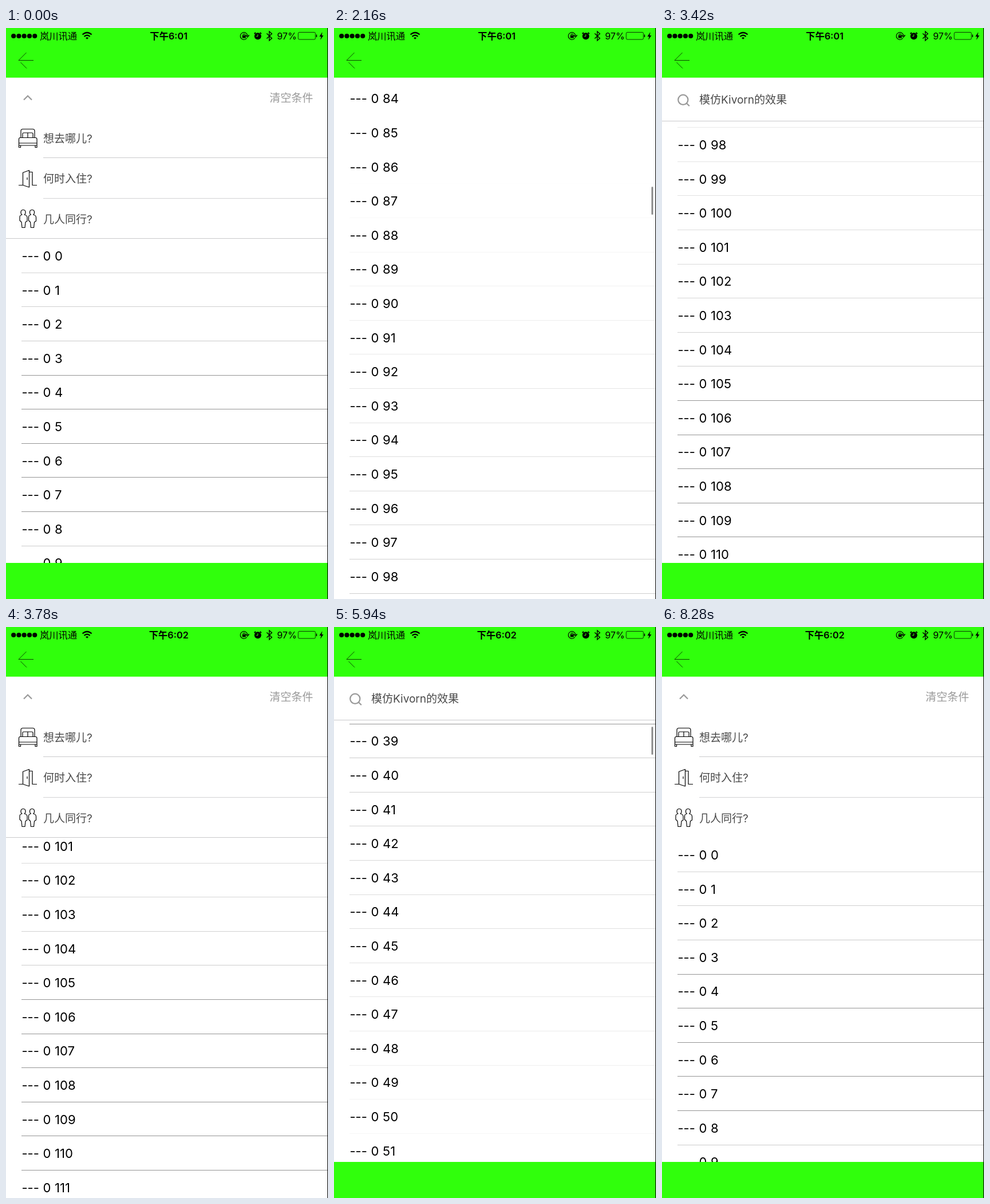
An HTML page for the animation above (8640 ms loop, 562x997 px).

```html
<!DOCTYPE html>
<html lang="zh-CN">
<head>
<meta charset="utf-8">
<title>List with a collapsing search header</title>
<style>
html, body { margin: 0; width: 100%; height: 100%; overflow: hidden; background: #fff; }
svg { display: block; width: 100vw; height: 100vh; }
text { font-family: Inter, "Noto Sans CJK SC", "Noto Sans CJK", sans-serif; }
#list text { font-size: 22px; word-spacing: .5px; }
.label { font-size: 19px; fill: #484848; }
.status { font-size: 16.3px; }
.line { fill: none; stroke: #000; stroke-width: 1.2; stroke-linejoin: round; }
.gray { fill: none; stroke: #999; stroke-width: 2.2; }
.rule { fill: #c9c9cb; }
.bar { fill: #30ff0c; }
</style>
</head>
<body>
<svg viewBox="0 0 562 997" preserveAspectRatio="none">
  <rect width="562" height="997" fill="#fff"/>
  <g id="list"></g>

  <g id="search">
    <rect id="sheet" y="86" width="561" height="77" fill="#fff"/>
    <rect id="edge" class="rule" width="561" height="1"/>
    <g id="prompt">
      <circle class="gray" cx="36.800" cy="125.300" r="8.600"/>
      <path class="gray" d="M42.800 131.300l5 5"/>
      <text class="label" x="65" y="132">模仿Kivorn的效果</text>
    </g>
  </g>

  <g id="panel">
    <path class="gray" d="M31 125.500l7-7 7 7"/>
    <text class="label" x="460" y="129" style="fill:#999">清空条件</text>
    <text class="label" x="65" y="199.500">想去哪儿?</text>
    <text class="label" x="65" y="270">何时入住?</text>
    <text class="label" x="65" y="340.500">几人同行?</text>
    <rect class="rule" x="65" y="226" width="496" height="1"/>
    <rect class="rule" x="65" y="297" width="496" height="1" opacity=".8"/>
    <rect id="foot" class="rule" y="367" width="561" height="1"/>
    <g class="line">
      <path d="M26 192v-12q0-3.500 3.500-3.500h17q3.500 0 3.500 3.500v12M29 191v-6q0-2 2-2h14q2 0 2 2v6M38 183v8M24.500 191.500h27q2.500 0 2.500 3v10.500h-31.500v-10.500q0-3 2-3zM22.500 201h31.500M22.500 205v3.500h3v-3.500M51 205v3.500h3v-3.500"/>
      <path d="M22 274.500h7.500v-22l11-4v29.500l-11-3.500M40.500 251.500h5.500v23h8M37 261v4"/>
      <path id="person" d="M30 317.500c5 0 5 7 2 8.500q5 1 5 5v6l-3 2-1 9.500h-5l-1-9.500-3-3v-6q0-3 4-4c-3-1.500-3-8.500 2-8.500z"/>
      <use href="#person" x="15.500"/>
    </g>
  </g>

  <rect id="thumb" x="554" width="3" height="49" rx="1.500" fill="#8e8e8e"/>
  <rect id="tabs" class="bar" width="561" height="64"/>

  <rect class="bar" width="561" height="86.700"/>
  <path d="M48 56.500H22l13.500-13.500M25.500 60l10.500 10.500" fill="none" stroke="#063000" stroke-width=".9"/>
  <path d="M13.200 14h38" stroke="#000" stroke-width="8.200" stroke-linecap="round" stroke-dasharray="0 9.250"/>
  <text class="status" x="59" y="20">岚川讯通</text>
  <g fill="none" stroke="#000" stroke-width="2.200">
    <path d="M133.500 11.500q8-7 16 0M136.500 14.800q5-4.400 10 0"/>
    <path d="M139 17.200q2.500-2 5 0l-2.500 2.600z" fill="#000" stroke="none"/>
  </g>
  <text id="clock" class="status" x="284" y="20" text-anchor="middle" font-weight="600"></text>
  <g fill="none" stroke="#000" stroke-width="1.200">
    <path d="M420.500 17.500a6.300 6.300 0 1 1 1-4.500M419 13h5l-2.500 3z"/>
    <path d="M412.500 13h6v4.500h-6z" fill="#000" stroke="none"/>
    <path d="M413.800 13v-1.500q1.700-2.500 3.400 0v1.500"/>
    <circle cx="439.500" cy="14.300" r="6" fill="#000" stroke="none"/>
    <path d="M433.300 10l2.500-2M445.700 10l-2.500-2" stroke-width="1.800"/>
    <path d="M439.500 11v3.500h-2.700" stroke="#30ff0c" stroke-width="1"/>
    <path d="M455 9.500l9 8.500-4.500 4V6l4.500 4-9 8.500" stroke-width="1.400"/>
    <rect x="510" y="7.500" width="30" height="12.500" rx="2" stroke-width=".8"/>
    <path d="M542 11.500v4.500" stroke-width="1.500"/>
  </g>
  <path d="M552 7l-5 8h3l-1.500 6 5.500-8h-3z"/>
  <text class="status" x="473" y="20" style="font-size:16px">97%</text>
  <rect x="561" width="1" height="997"/>
</svg>

<script>
const LOOP = 8640, STEP = 180, PITCH = 59.6, FIRST = 398, ROWS = 17;
const $ = id => document.getElementById(id);
const clamp = v => Math.max(0, Math.min(1, v));
const set = (id, attrs) => {
  for (const k in attrs) $(id).setAttribute(k, attrs[k]);
};

// Each track is a list of [time, value] points joined by straight lines.
const scroll = [[1080, 0], [1260, 60], [1440, 600], [2160, 5281], [2520, 6000],
  [2880, 6220], [3060, 6200], [3420, 6034.8], [5040, 6034.8], [5220, 5800],
  [5940, 2523], [6300, 1150], [6840, 200], [7020, 200], [7200, 109],
  [7380, 80], [7740, 36], [8100, 6], [8280, 0]];
const hiding = [[1080, 0], [1440, 1], [2880, 1], [3240, 0.3], [3420, 0]];
const opening = [[3420, 0], [3780, 1], [4680, 1], [5040, 0]];
const darkest = [[1080, 726], [2160, 1202], [3420, 800], [5040, 800],
  [5940, 50], [7020, 130], [7200, 139], [8280, 726]];

function at(track, t) {
  const i = track.findIndex(p => p[0] > t);
  if (i < 0) return track[track.length - 1][1];
  if (!i) return track[0][1];
  const [t0, a] = track[i - 1], [t1, b] = track[i];
  return a + (b - a) * (t - t0) / (t1 - t0);
}

function add(tag, attrs) {
  const el = document.createElementNS("http://www.w3.org/2000/svg", tag);
  for (const k in attrs) el.setAttribute(k, attrs[k]);
  return $("list").appendChild(el);
}
const rows = Array.from({ length: ROWS }, () => ({
  text: add("text", { x: 27.5 }),
  rule: add("rect", { x: 27, width: 534, height: 1 })
}));

function drawList(s, peak) {
  const top = Math.max(0, Math.floor((s - FIRST + 57) / PITCH));
  rows.forEach(({ text, rule }, k) => {
    const n = top + k, y = FIRST + n * PITCH - s, end = y + PITCH / 2;
    text.textContent = "--- 0 " + n;
    text.setAttribute("y", y + 8);
    // Thin separators shimmer with their position on the screen.
    const d = Math.abs(end - peak) / PITCH;
    rule.setAttribute("y", Math.floor(end - 0.5));
    rule.setAttribute("opacity", d < 2.6 ? 0.42 : 0.25 * clamp(1 - d / 16));
  });
}

function draw(t) {
  const s = at(scroll, t), hide = at(hiding, t), open = at(opening, t);
  const bottom = 163 + 205 * open;
  drawList(s, at(darkest, t));

  set("search", { opacity: clamp((s - 200) / 100), transform: `translate(0 ${-77 * hide})` });
  set("sheet", { height: bottom - 86 });
  set("edge", { y: Math.floor(bottom - 0.5) });
  set("prompt", { opacity: 1 - open });

  set("panel", {
    opacity: Math.max(open, clamp(1 - s / 109)),
    transform: `translate(0 ${open ? 0 : -s})`
  });
  set("foot", { opacity: t < 1800 ? 1 : 0 });
  set("tabs", { y: 934 + 63 * Math.max(hide, open) });

  const moving = t >= 1260 && t < 3420 || t >= 5220 && t < 8280;
  set("thumb", { y: Math.max(80 + 0.0373 * s, 373 - s), opacity: moving ? 1 : 0 });
  $("clock").textContent = t < 3780 ? "下午6:01" : "下午6:02";
}

const start = performance.now();
function frame() {
  const t = (performance.now() - start) % LOOP;
  draw(Math.floor(t / STEP) * STEP);
  requestAnimationFrame(frame);
}
frame();
</script>
</body>
</html>
```
